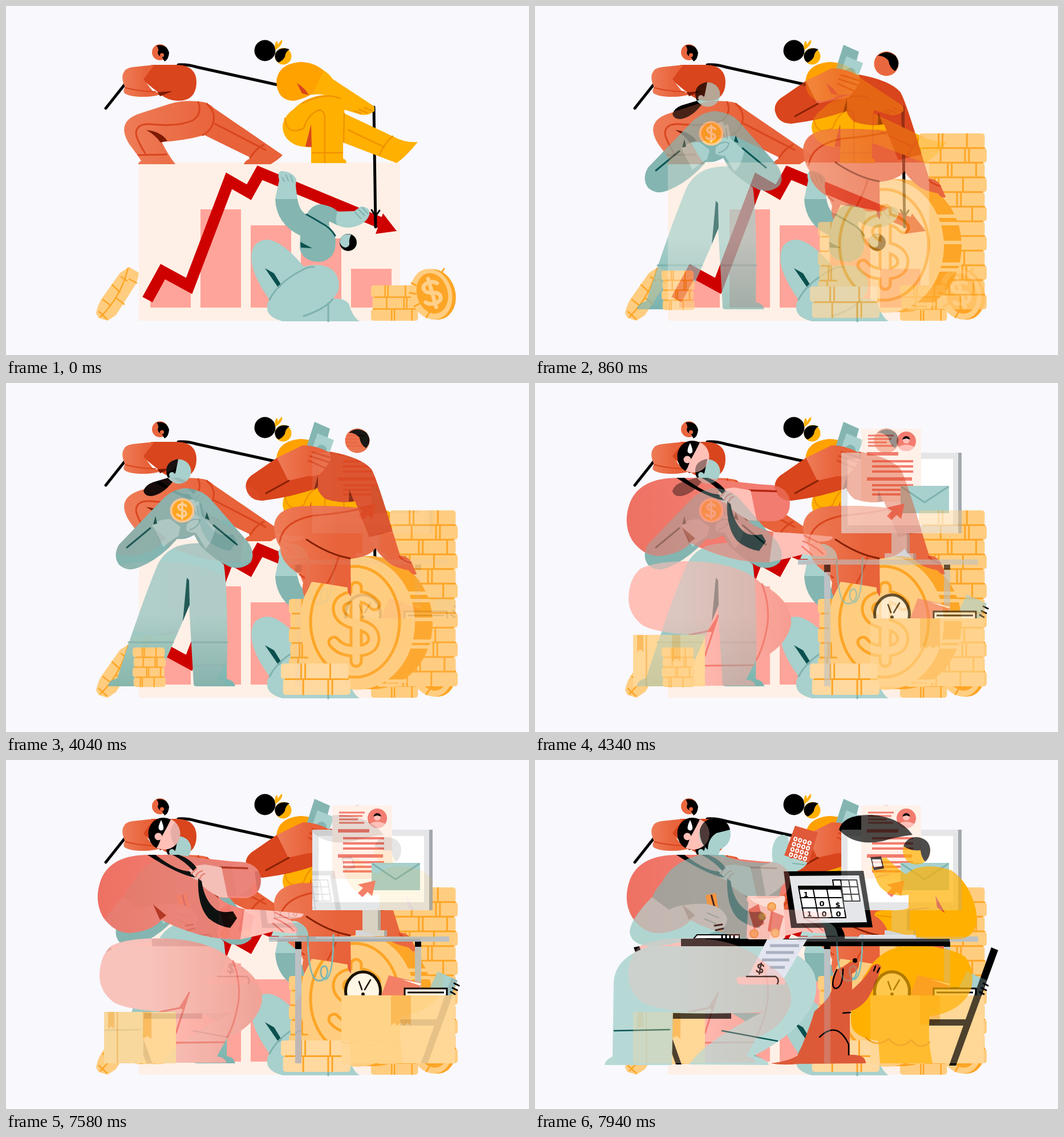
An HTML page for the animation above (8 s loop, 917 by 611 pixels).

```html
<!DOCTYPE html>
<html lang="en">
<head>
<meta charset="utf-8">
<title>Money scenes</title>
<style>
html, body { margin: 0; height: 100%; overflow: hidden; background: #f8f8fd; }
svg { display: block; width: 100%; height: 100%; }
mask { mask-type: alpha; }
.l { fill: none; stroke-linecap: round; stroke-linejoin: round; }
.red { fill: #e9673f; } .dred { fill: #d9451d; } .wine { fill: #7d1a02; }
.teal { fill: #a8d0cc; } .dteal { fill: #84b5b1; } .deep { fill: #0a504e; }
.gold { fill: #ffb000; } .amber { fill: #ffa200; }
.coin { fill: #ffcd80; } .rim { fill: #fda526; }
.pink { fill: #ffc0b8; } .coral { fill: #f27c6f; } .card { fill: #ffd797; } .tape { fill: #fbbc60; }
.sr { stroke: #d9451d; } .st { stroke: #7fb2ae; } .sy { stroke: #f09200; } .sc { stroke: #fda526; }
.sk { stroke: #000; } .sp { stroke: #f27c6f; } .sd { stroke: #0a5654; }
.layer > *, .fade { opacity: 0; animation: 8s step-end infinite; }

#keepA { animation-name: keepA; }
#keepB { animation-name: keepB; }
#keepC { animation-name: keepC; }
#underB { animation-name: underB; }
#underC { animation-name: underC; }
#underD { animation-name: underD; }
#fadeB { animation-name: fadeB; }
#fadeC { animation-name: fadeC; }
#fadeD { animation-name: fadeD; }
@keyframes keepA { 0%, 50.5%, 94.75% { opacity: 1; } 13%, 57.25% { opacity: 0; } 100% { opacity: 1; } }
@keyframes keepB { 0%, 57.25% { opacity: 0; } 13%, 94.75%, 100% { opacity: 1; } }
@keyframes keepC { 0% { opacity: 0; } 57.25%, 100% { opacity: 1; } }
/* A scene blends with the one before it; beside that one it shows whole, from half strength on. */
@keyframes underB { 0%, 13%, 100% { opacity: 0; } 9.25% { opacity: 1; } }
@keyframes underC { 0%, 57.25%, 100% { opacity: 0; } 53.5% { opacity: 1; } }
@keyframes underD { 0% { opacity: 0; } 97.75%, 100% { opacity: 1; } }
@keyframes fadeB {
  0% { opacity: 0; }
  6.25% { opacity: .1; animation-timing-function: steps(9); }
  12.999% { opacity: 1; }
  13%, 100% { opacity: 0; }
}
@keyframes fadeC {
  0% { opacity: 0; }
  50.5% { opacity: .1; animation-timing-function: steps(9); }
  57.249% { opacity: 1; }
  57.25%, 100% { opacity: 0; }
}
@keyframes fadeD {
  0% { opacity: 0; }
  94.75% { opacity: .1; animation-timing-function: steps(7); }
  100% { opacity: .8; }
}
</style>
</head>
<body>
<svg viewBox="0 0 917 611" preserveAspectRatio="none">
<defs>
<linearGradient id="gRed"><stop offset="0" stop-color="#ee7c57"/><stop offset=".6" stop-color="#e8623a"/></linearGradient>
<linearGradient id="gTeal" x2="0" y2="1"><stop offset=".5" stop-color="#a8d0cc"/><stop offset="1" stop-color="#7ab3ae"/></linearGradient>
<linearGradient id="gPink"><stop offset=".3" stop-color="#ffc0b8"/><stop offset="1" stop-color="#f79c90"/></linearGradient>
<linearGradient id="gCoral"><stop offset="0" stop-color="#ee7163"/><stop offset=".5" stop-color="#f27c6f"/></linearGradient>
<path id="usd" class="l" d="M32-34Q18-50-4-48Q-33-45-31-24Q-28-6 1 0Q32 7 31 27Q29 47-2 47Q-27 47-39 32M0-64V65"/>

<!-- falling chart -->
<g id="a">
  <path fill="#fef0e6" d="M233 274H691V551H233Z"/>
  <path fill="#ffa49a" d="M253 500L275 470L324 497V528H253ZM341 356H412V528H341ZM429 384H500V528H429ZM517 407H588V528H517ZM605 460H676V528H605Z"/>
  <path fill="none" stroke="#cf0000" stroke-width="20" d="M248 514L275 465L321 490L391 306L426 326L445 292L658 380"/>
  <path fill="#cf0000" d="M661 363L685 394L648 399Z"/>
  <path class="l sk" stroke-width="5" d="M645 177L648 387M175 179L210 135M302 103Q318 102 335 107L476 138"/>
  <path class="l sk" stroke-width="3" d="M641 357L648 368L655 358"/>
  <!-- puller in red -->
  <circle class="red" cx="270" cy="81" r="14"/>
  <path d="M264 69Q282 66 286 82Q285 94 278 97Q275 93 274 90Q266 87 266 81Q269 76 264 69Z"/>
  <circle class="red" cx="273.500" cy="86" r="3.500"/>
  <path class="dred" d="M255 103H300Q334 104 334 134Q333 166 302 166Q284 166 270 154L238 128Z"/>
  <path fill="url(#gRed)" d="M222 107L260 103L241 128L258 150L275 153Q262 159 240 159Q215 159 207 152Q205 146 209 143Q202 128 205 119Q209 108 222 107Z"/>
  <path class="wine" d="M266 151L292 149L270 158Z"/>
  <path class="l sr" stroke-width="2" d="M209 143Q235 150 262 150"/>
  <path fill="url(#gRed)" d="M345 168Q312 163 285 172L232 189Q207 198 207 217Q208 230 217 243Q230 260 237 271Q232 273 232 277H297Q284 260 273 238Q312 236 348 226L430 266Q418 271 417 277H464Q479 268 485 261L365 179Q354 169 345 168Z"/>
  <path class="wine" d="M246 217Q272 220 283 236L271 239Q262 226 246 217Z"/>
  <path class="l sr" stroke-width="3" d="M232 261L281 260M244 258Q228 232 228 222Q229 205 255 207Q302 212 328 200Q345 188 337 168M352 171Q370 186 362 208Q357 220 345 226M366 206L455 252M428 266Q438 249 452 243"/>
  <!-- puller in yellow -->
  <circle cx="454" cy="78" r="18.500"/>
  <circle class="gold" cx="486" cy="88" r="14.500"/>
  <path d="M497 76Q488 72 479 76Q467 84 474 96L478 99Q486 95 489 89Q490 80 497 76Z"/>
  <path class="gold" d="M472 77Q470 65 475 61Q479 67 474 76Q477 64 484 59Q486 68 472 77Z"/>
  <path class="gold" d="M540 104L556 112Q566 118 573 128L646 176V184Q635 193 621 190L592 181Q585 163 570 158Q553 152 530 156Z"/>
  <path class="amber" d="M515 98Q476 102 474 133Q476 166 505 166Q522 163 538 153L557 113Q540 98 515 98Z"/>
  <path class="dred" d="M510 135Q525 144 531 156L519 153Z"/>
  <path class="gold" d="M565 155Q527 157 505 180Q485 194 485 213Q487 235 510 244Q522 248 535 247V275H597Q597 269 591 267V239L685 275Q702 263 722 238Q700 240 680 229L593 188Q596 165 580 157Z"/>
  <path class="dred" d="M535 207L536 247L525 246Z"/>
  <path class="l sy" stroke-width="2.500" d="M489 197Q492 228 522 214Q530 188 550 182Q560 184 559 200V274M537 257H590M593 188L592 238M600 217L663 247M655 261Q663 240 678 228M520 170Q560 150 586 162M612 184L622 188M619 181L633 187M628 178L641 183"/>
  <!-- figure under the line -->
  <path class="teal" d="M472 338L479 305Q475 292 482 289Q501 289 509 303L508 315L511 338Z"/>
  <path class="dteal" d="M472 338H511Q515 360 527 365Q536 348 552 347Q572 350 582 360L581 384L567 377Q564 388 577 402Q583 442 551 448Q520 448 515 424L516 402Q474 382 472 338Z"/>
  <path class="teal" d="M581 360L611 359L622 351Q640 352 637 366Q630 384 603 388Q588 388 580 383Q577 372 581 360Z"/>
  <path class="l sd" stroke-width="3" d="M527 365Q540 372 553 380Q569 388 577 402"/>
  <path class="deep" d="M516 413L537 424L517 423Z"/>
  <path class="l st" stroke-width="2" d="M484 300L488 307M491 296L495 306M499 297L503 308M612 361L622 372M618 356L629 367M625 353L634 363"/>
  <circle cx="600" cy="414" r="15"/>
  <path class="teal" d="M605 400Q588 397 585 413Q587 421 595 423Q603 422 602 414Q601 410 605 400Z"/>
  <path class="teal" d="M430 440Q431 409 460 409Q485 412 522 456Q555 448 574 463Q588 480 582 500Q578 508 573 512Q593 511 601 521Q608 545 620 552H485Q459 545 458 530Q457 520 462 514Q430 470 430 440Z"/>
  <path class="deep" d="M454 459L470 468L483 489L478 494Z"/>
  <path class="l st" stroke-width="3" d="M462 514Q478 483 520 462Q530 456 540 457M522 543Q560 530 573 513M565 520V552"/>
  <!-- coins -->
  <path class="coin" d="M216 457L233 467Q232 478 227 488L193 541L178 551L162 546L158 538Q160 525 168 512L200 467Z"/>
  <path class="l sc" stroke-width="2.500" d="M214 459Q202 508 166 544M216 478L229 485M202 474L212 481M186 488L200 501M193 511L207 522M170 514L183 524M163 535L177 548"/>
  <g data-stack="640 489 85 3 20.700"></g>
  <g transform="rotate(-16 748 505)">
    <ellipse class="rim" cx="752" cy="506" rx="36" ry="45"/>
    <ellipse class="coin" cx="746" cy="504" rx="36" ry="45"/>
    <ellipse class="rim" cx="748" cy="503" rx="27" ry="36"/>
    <use href="#usd" stroke="#ffd08a" stroke-width="17" transform="translate(748 502)scale(.4)"/>
  </g>
  <path class="l sc" stroke-width="3" d="M711 485L719 489M708 502L718 504M716 526L725 521M737 545L742 537M764 466L768 460"/>
</g>

<!-- savings -->
<g id="b">
  <g data-stack="673 223 119 12 25.670"></g>
  <g data-stack="496 378 80 5 25.670"></g>
  <ellipse class="rim" cx="644" cy="420" rx="104" ry="116"/>
  <path class="rim" d="M616 303H648V536H616Z"/>
  <path class="l" stroke="#ffcd80" stroke-width="6" stroke-linecap="butt" d="M698 368H739M704 381H742M714 414H748M712 452H745M710 462H741M668 522H700M655 529H682"/>
  <ellipse class="coin" cx="616" cy="420" rx="101" ry="117"/>
  <ellipse class="l sc" stroke-width="5" cx="612" cy="418" rx="78" ry="97"/>
  <use href="#usd" class="sc" stroke-width="23" transform="translate(614 422)"/>
  <use href="#usd" stroke="#ffcd80" stroke-width="13" transform="translate(614 422)"/>
  <g data-stack="482 491 122 2 27.500 #ffd9a0"></g>
  <!-- seated -->
  <path class="dteal" d="M541 68L568 80L558 118L527 112Z"/>
  <path class="teal" d="M546 88L575 100L565 128L536 118Z"/>
  <circle class="dteal" cx="553" cy="117" r="9"/>
  <circle class="red" cx="616" cy="101" r="21.500"/>
  <path d="M601 87Q616 75 632 87Q643 102 631 114Q621 107 620 96Q613 87 601 87Z"/>
  <path fill="url(#gRed)" d="M625 219Q560 213 515 216Q473 220 470 250Q470 272 481 288Q481 315 515 335L521 350Q518 362 523 374Q528 365 536 348Q565 352 599 358Q598 367 605 374L604 308Q632 305 645 293L660 270Z"/>
  <path class="dred" d="M568 120Q622 130 640 150Q648 160 678 260L637 270L612 207Q590 212 560 203Q549 194 546 184Q500 200 450 206Q426 206 421 185Q418 172 430 162L475 131L500 165L550 160Z"/>
  <path fill="url(#gRed)" d="M475 131L520 109Q545 109 568 122Q571 134 566 140L555 155Q545 165 530 163L495 171Z"/>
  <path class="red" d="M637 270L678 260L691 302Q706 303 712 316L720 334Q715 339 706 328Q688 325 676 318Q650 300 637 270Z"/>
  <path class="l sr" stroke-width="3" d="M537 121L567 130M533 128L567 139M531 136L560 149M480 278Q485 242 540 232Q590 228 622 220M583 305Q576 330 564 350M515 335L523 341M690 304Q697 312 710 315"/>
  <path class="l" stroke="#872004" stroke-width="3" d="M527 274Q565 300 603 307M456 193L496 171"/>
  <path class="wine" d="M547 162L547 182L540 187ZM602 187L610 207L601 208Z"/>
  <!-- standing -->
  <path fill="url(#gTeal)" d="M350 281Q323 279 300 286Q275 297 265 320Q236 390 195 517Q180 520 179 531H260L310 417L321 390L329 525Q328 531 335 531H402Q400 521 387 518Q390 370 382 318Q365 305 350 281Z"/>
  <path class="deep" d="M317 341L321 345L322 388L310 417Z"/>
  <path class="l st" stroke-width="3" d="M215 454H293M326 454H388"/>
  <circle class="teal" cx="303" cy="155" r="21.500"/>
  <path d="M302 133Q280 137 281 156Q282 168 292 173Q275 195 255 198Q243 198 241 189Q244 179 257 174L287 165L297 158Q300 145 302 133Z"/>
  <circle class="teal" cx="291" cy="161" r="5"/>
  <path class="dteal" d="M315 184Q345 186 362 207L424 278Q438 298 429 314Q414 328 393 322Q365 310 340 284L330 266Q315 275 300 273L285 289Q260 312 235 322Q213 332 198 318Q187 302 198 283L272 206Q290 186 315 184Z"/>
  <path class="teal" d="M256 248Q270 238 288 238L306 252L302 268Q288 276 276 287ZM322 204Q330 199 332 210Q340 203 340 214L343 232L367 254Q361 280 350 290L333 262Q318 262 316 257Z"/>
  <path class="l st" stroke-width="2" d="M327 213L333 230M335 215L337 232M317 246Q328 235 340 240Q338 252 322 257"/>
  <path class="l sd" stroke-width="3" d="M212 288L253 254M364 249L405 283"/>
  <path class="deep" d="M262 233L265 246L258 248ZM352 226L357 240L349 237Z"/>
  <circle fill="#ffce93" cx="309" cy="223" r="21.500"/>
  <circle fill="#ffab18" cx="309" cy="223" r="17.500"/>
  <use href="#usd" stroke="#ffd9a0" stroke-width="17" transform="translate(309 223)scale(.22)"/>
  <g data-stack="222 463 58 4 17.300"></g>
</g>

<!-- desk job -->
<g id="c">
  <path fill="#bcc1c4" d="M507 318H518V531H507ZM717 318H728V531H717ZM461 309H777V318H461Z"/>
  <path d="M507 318H518V331H507ZM717 318H728V327H717Z"/>
  <path fill="#a3a8ae" d="M742 122H748V263H742ZM652 263H657V299H652ZM660 298H668V308H660Z"/>
  <path fill="#e5e6e8" d="M537 122H742V263H537Z"/>
  <path fill="#d4d6d9" d="M625 263H652V298H663V308H613V298H625Z"/>
  <path fill="#fff" d="M548 133H733V249H548Z"/>
  <path fill="#fff0e8" d="M572 80H677V208H572Z"/>
  <path class="coral" d="M582 121H637V127H582ZM582 165H661V171H582Z"/>
  <path class="sp" stroke-width="3" d="M584 92H629M584 98H625M584 104H617M584 110H628"/>
  <path class="sp" stroke-width="4" d="M591 137H663M591 146H663M591 155H663M591 179H663M591 187H643M591 195H643"/>
  <circle class="coral" cx="651" cy="102" r="17"/>
  <path class="pink" d="M637 112Q651 104 665 112Q651 126 637 112Z"/>
  <circle class="pink" cx="651" cy="100" r="6"/>
  <path d="M644 99Q646 93 651 93Q656 93 658 99L651 97Z"/>
  <path class="teal" d="M641 180H726V228H641Z"/>
  <path class="l st" stroke-width="3" d="M643 182L683 209L724 182"/>
  <path class="coral" d="M648 211L642 238L634 231L625 240L617 233L626 224L617 218Z"/>
  <path class="l" stroke="#7fbcb8" stroke-width="3" d="M529 307Q530 382 546 386Q561 388 564 371Q562 355 553 364Q549 379 560 384Q574 380 574 306"/>
  <!-- sitter -->
  <circle class="pink" cx="277.500" cy="129" r="28"/>
  <path d="M289 104Q270 96 257 109Q246 122 251 138Q255 150 264 154Q269 147 271 138L282 118Z"/>
  <circle class="pink" cx="267" cy="134" r="6.500"/>
  <path fill="#fff" d="M272 105Q266 117 268 121Q272 126 276 121Q277 116 272 105Z"/>
  <path fill="url(#gPink)" d="M262 312Q330 312 370 332Q386 340 398 352Q450 380 449 422Q440 465 387 487L370 519Q383 520 387 530H298V441Q220 440 190 425Q163 405 164 375Q165 342 185 325Q210 313 262 312Z"/>
  <path class="l sp" stroke-width="3" d="M398 352Q411 385 408 420Q402 460 388 485M298 495L383 494M270 441L310 433L321 407L298 478"/>
  <path class="coral" d="M321 406L311 437L303 434Z"/>
  <path class="card" d="M172 441H298V531H172Z"/>
  <path class="tape" d="M179 441h11v30l-5-5-6 5zM194 441h2.500v90h-2.500zM240 441h15v47l-7-5-8 5z"/>
  <path fill="url(#gCoral)" d="M250 166Q185 166 167 208Q153 245 170 275Q190 303 217 303Q255 300 273 280Q300 295 340 306Q375 315 412 314L419 261Q390 256 373 241L420 242Q447 238 447 210Q446 185 418 179Q370 176 300 166Z"/>
  <path fill="#b42712" d="M258 253L281 272L270 280ZM336 208L374 237L372 242Z"/>
  <path class="l" stroke="#b42712" stroke-width="3.500" d="M376 188L423 189.500"/>
  <path class="pink" d="M320 196Q325 184 350 183L378 188L389 241L374 240Q345 225 337 211Q321 206 320 196Z"/>
  <path d="M248 166H262Q300 195 322 195L332 206Q300 200 248 166ZM292 166H303Q325 174 335 190L328 194Q315 178 292 166Z"/>
  <path d="M337 207L343 212Q348 248 370 263Q380 268 398 265L405 277L393 294Q372 291 355 277Q335 255 337 207Z"/>
  <path fill="#b3dad5" d="M465 308Q475 280 508 282Q530 290 530 308Z"/>
  <path class="pink" d="M418 261Q450 262 480 265L522 269Q522 275 510 277L497 278L511 295Q514 304 502 304L470 300Q440 308 411 314Z"/>
  <path class="l sp" stroke-width="2.500" d="M472 267L497 279M470 277Q488 283 505 299M468 286L486 301M325 199L334 190M333 204Q334 197 344 194M340 209Q340 202 348 199"/>
  <!-- packed box -->
  <ellipse fill="#fff" stroke="#000" stroke-width="5" cx="626" cy="405" rx="30.500" ry="34"/>
  <path class="l sk" stroke-width="2.500" d="M624 402L619 388M629 402L639 385"/>
  <circle cx="626" cy="410" r="3"/>
  <path class="coral" d="M671 377L728 390L722 415H657Z"/>
  <path fill="#fff" d="M694 384L728 391L726 395Z"/>
  <path class="teal" d="M757 370L792 386L780 413L742 402Z"/>
  <path fill="#fff" stroke="#000" stroke-width="3" d="M699 400H773V415H699ZM704 407H768"/>
  <path class="l sk" stroke-width="3" d="M786 391L794 395M783 399L791 403M780 406L787 410"/>
  <path class="card" d="M588 412H787V531H588Z"/>
  <path class="tape" d="M675 412h35v53l-6-5-6 5-6-5-6 5-5-5-6 5z"/>
</g>

<!-- budget table -->
<g id="d">
  <path d="M173 328L183 326L257 533H247ZM238 443H344V453H238ZM800 328L812 333L738 535H726ZM677 454H760V465H677Z"/>
  <path class="dteal" d="M345 443H402L372 459Z"/>
  <path fill="#b7d9d6" d="M185 332Q138 352 138 392L136 519Q122 526 122 534H240L242 443Q350 445 400 441Q300 490 270 533L410 534Q410 525 383 518Q450 485 480 440Q500 410 490 375Q470 330 400 326H200Z"/>
  <path class="l sd" stroke-width="2.500" d="M139 474L236 472M328 474L425 492"/>
  <circle class="teal" cx="315" cy="130" r="28"/>
  <path d="M289 122Q295 102 317 102Q338 104 342 122L318 128Q303 138 303 157Q288 145 289 122Z"/>
  <path class="dteal" d="M290 166Q240 178 222 215Q180 260 250 270L330 318H372Q405 300 425 250L442 181L395 180Q350 178 330 166Z"/>
  <path fill="#f5a02c" d="M299 237L317 233L322 264L305 266ZM316 288L327 287L326 301Z"/>
  <path class="sk" stroke-width="3" d="M309 236L316 262"/>
  <path fill="#b0d5d1" d="M205 240Q166 280 166 302Q170 328 215 326Q262 320 310 302Q336 298 337 278Q330 256 300 252Q260 250 235 262ZM405 240L395 186L417 178Q412 152 424 136Q436 126 444 136L447 172L480 172Q478 190 450 198Q435 225 405 240Z"/>
  <path class="l st" stroke-width="2" d="M302 268L322 276M297 278L318 287M452 181L472 183"/>
  <path class="l sk" stroke-width="3" d="M317 298L330 295M315 290L328 288"/>
  <path fill="#e0593a" d="M456 115L496 127L480 180L437 167Z"/>
  <g id="keys" fill="none" stroke="#fff" stroke-width="2" transform="translate(456 137)rotate(16)"></g>
  <!-- partner -->
  <path d="M533 122Q540 95 590 96Q640 100 662 131Q635 134 610 142Q560 152 533 122Z"/>
  <circle class="gold" cx="669" cy="159" r="24"/>
  <path d="M646 151Q652 135 669 135Q692 137 693 158Q692 172 684 178Q677 170 676 158Q660 160 646 151Z"/>
  <path class="gold" d="M590 190Q595 175 615 170Q635 190 650 200L662 192Q690 180 730 193Q762 215 773 262Q780 303 750 313Q690 318 645 305L618 298Q610 280 595 272Q595 262 620 263Q650 264 655 258V236Q615 242 600 214Z"/>
  <path class="dred" d="M702 237L719 268L705 258Z"/>
  <path d="M588 170L607 169L612 190L594 193Z"/>
  <path fill="#fff" d="M591 174H606L609 186L594 188Z"/>
  <path class="l sy" stroke-width="2" d="M597 195L616 192M600 205L620 200M600 272L625 275M655 262L690 259"/>
  <path class="gold" d="M640 327Q720 322 755 345Q772 370 765 400Q750 440 692 449Q688 490 697 531H605L602 492Q560 486 555 465Q550 430 570 400Q588 338 640 327Z"/>
  <path class="l sy" stroke-width="2.500" d="M580 486Q600 505 620 488Q640 510 660 490Q675 510 692 494"/>
  <!-- desk -->
  <path d="M256 313H727V326H256Z"/>
  <path fill="#fff" stroke="#000" stroke-width="2" d="M284 306H358V313H278Z"/>
  <path class="sk" stroke-width="3" d="M328 305V314M335 305V314M342 305V314M349 305V314"/>
  <path fill="#e4e6ec" d="M570 306H668V313H565Z"/>
  <path d="M436 195L576 194L592 293L449 294ZM505 290L533 288Q545 302 543 314H512Z"/>
  <path fill="#e4e6ea" d="M446 203L568 202L582 284L459 286Z"/>
  <g class="l sk" stroke-width="2">
    <path fill="#fff" d="M522 210H564L570 247H527Z"/>
    <path d="M524 222H566M526 235H568M536 210L541 247M550 210L556 247"/>
    <path fill="#fff" d="M462 222H536L545 276H472Z"/>
    <path d="M465 241H539M468 259H542M487 222L497 276M511 222L521 276"/>
  </g>
  <path d="M461 220H536L537 227H463Z"/>
  <g font-family="'DejaVu Sans', sans-serif" font-weight="bold" font-size="13" text-anchor="middle">
    <text x="475" y="240">1</text><text x="503" y="256">0</text><text x="531" y="258">$</text>
    <text x="481" y="274">1</text><text x="507" y="274">0</text><text x="532" y="274">0</text>
  </g>
  <path fill="#fbdcd2" d="M373 238H437Q441 244 436 250L439 308Q438 314 432 314H377Q371 314 371 308L374 250Q369 244 373 238Z"/>
  <path fill="#e36a5a" d="M374 262L392 252L402 287L384 296ZM414 264L436 273L427 306L408 299Z"/>
  <g fill="#f8b063" stroke="#ee9440" stroke-width="2"><circle cx="415" cy="257" r="7"/><circle cx="384" cy="304" r="7"/><circle cx="421" cy="303" r="7"/><circle cx="398" cy="274" r="6"/></g>
  <path fill="#e3e6f0" d="M407 314H477L432 390H368Z"/>
  <path stroke="#aab0c2" stroke-width="5" d="M412 325H463M405 337H454M398 350H446M412 363H438"/>
  <path fill="#f6cfc9" d="M355 380H430Q443 382 437 393H360Q350 390 355 380Z"/>
  <path class="l sk" stroke-width="2.500" d="M371 379H422Q429 384 425 392"/>
  <circle fill="#fbdcd6" cx="395" cy="365" r="13"/>
  <use href="#usd" class="sk" stroke-width="17" transform="translate(395 365)rotate(10)scale(.15)"/>
  <!-- dog -->
  <path fill="#dd5a38" d="M520 400Q518 367 540 362Q560 347 568 352Q570 368 556 374V402Q582 380 590 362Q600 352 607 362Q600 388 585 415Q572 434 552 440V516Q580 515 580 531L462 532Q435 535 413 531Q442 528 460 518Q478 480 490 440Q520 415 520 400Z"/>
  <path class="l sk" stroke-width="2.500" d="M529 367Q517 395 526 400Q540 400 540 366M499 485Q530 455 550 498V516M594 369L597 361M600 372L604 364M540 443L553 442"/>
  <circle cx="561" cy="351" r="4"/>
</g>

<mask id="onA" maskUnits="userSpaceOnUse" x="0" y="0" width="917" height="611"><use href="#a"/></mask>
<mask id="onB" maskUnits="userSpaceOnUse" x="0" y="0" width="917" height="611"><use href="#b"/></mask>
<mask id="onC" maskUnits="userSpaceOnUse" x="0" y="0" width="917" height="611"><use href="#c"/></mask>
</defs>

<g class="layer">
  <use id="underB" href="#b"/><use id="keepA" href="#a"/>
  <use id="underC" href="#c"/><use id="keepB" href="#b"/>
  <use id="underD" href="#d"/><use id="keepC" href="#c"/>
</g>
<g mask="url(#onA)"><use id="fadeB" class="fade" href="#b"/></g>
<g mask="url(#onB)"><use id="fadeC" class="fade" href="#c"/></g>
<g mask="url(#onC)"><use id="fadeD" class="fade" href="#d"/></g>
</svg>
<script>
// Piles of coins seen from the side: one rounded slab per row, with ridges.
function pile(x, y, w, rows, h, fill = '#ffcd80') {
  let slabs = '', ridges = '';
  for (let i = 0; i < rows; i++) {
    const left = x + (i % 2 ? w * 0.03 : 0), top = y + i * h, wide = w * 0.97;
    slabs += `<rect x="${left}" y="${top}" width="${wide}" height="${h}" rx="5"/>`;
    if (i) ridges += `M${left + 4} ${top}h${wide - 8}`;
    const p = 0.12 + (0.18 + 0.37 * i) % 0.6;
    for (const q of [p, p + 0.06, 0.1 + (p + 0.33) % 0.8]) ridges += `M${left + wide * q} ${top + 1}v${h - 2}`;
  }
  return `<g fill="${fill}">${slabs}</g><path class="l sc" stroke-width="${h > 22 ? 3 : 2.5}" d="${ridges}"/>`;
}
for (const g of document.querySelectorAll('[data-stack]')) {
  const [x, y, w, rows, h, fill] = g.dataset.stack.split(' ');
  g.innerHTML = pile(+x, +y, +w, +rows, +h, fill);
}
let dots = '';
for (let i = 0; i < 16; i++) dots += `<ellipse cx="${i % 4 * 8.5 + 1}" cy="${(i >> 2) * 9.5 + 1}" rx="2.5" ry="3"/>`;
document.getElementById('keys').innerHTML = dots;
</script>
</body>
</html>
```
